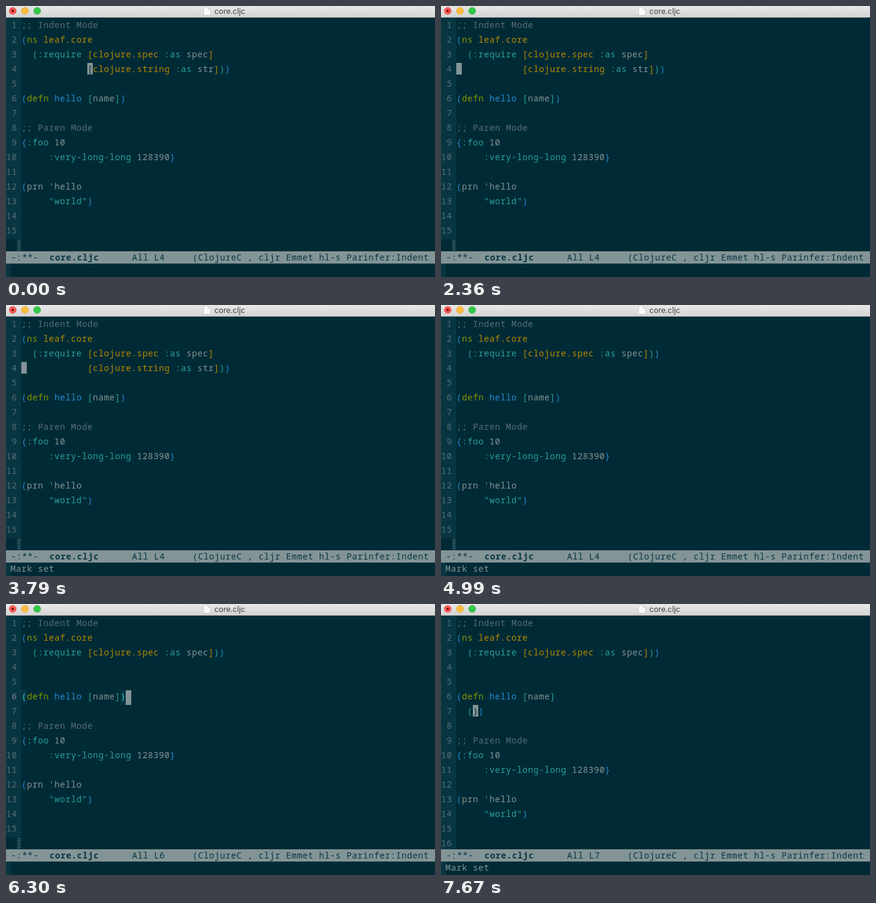
An HTML page for the animation above (8000 ms loop, 702 by 443 pixels).

```html
<!DOCTYPE html>
<html lang="en">
<head>
<meta charset="utf-8">
<title>core.cljc</title>
<style>
  html, body { margin: 0; width: 100%; height: 100%; overflow: hidden; background: #002b36; }
  svg { display: block; width: 702px; height: 443px; }
  text { font: 14px "Noto Sans Mono", monospace; letter-spacing: .6px; white-space: pre; }
  .bold { font-weight: 700; }
  #title { font: 12.5px Inter, sans-serif; letter-spacing: 0; }
</style>
</head>
<body>
<svg viewBox="0 0 702 443">
  <defs>
    <linearGradient id="bar" x2="0" y2="1">
      <stop stop-color="#e8e8e8"/><stop offset="1" stop-color="#d3d3d3"/>
    </linearGradient>
  </defs>
  <rect width="702" height="443" fill="#002b36"/>
  <rect y="19" width="25" height="382" fill="#073642"/>
  <g id="editor"></g>
  <rect y="401" width="702" height="20" fill="#839496"/>
  <rect y="421" width="8" height="22" fill="#073642"/>
  <g id="status"></g>
  <rect width="702" height="19" fill="url(#bar)"/>
  <rect y="18" width="702" height="1" fill="#b4b4b4"/>
  <g stroke-width=".6">
    <circle cx="11" cy="8" r="5.8" fill="#fc5b57" stroke="#e0443e"/>
    <circle cx="11" cy="8" r="2" fill="#6b0a08"/>
    <circle cx="31" cy="8" r="5.8" fill="#fdbc40" stroke="#dea034"/>
    <circle cx="51" cy="8" r="5.8" fill="#34c84a" stroke="#27aa35"/>
  </g>
  <path d="M323.5 1.5h7l4 4v9.5h-11z" fill="#fafafa" stroke="#c6c6c6" stroke-width=".8"/>
  <path d="M330.5 1.5v4h4" fill="#e6e6e6" stroke="#c6c6c6" stroke-width=".8"/>
  <text id="title" x="341" y="12.5" fill="#404040">core.cljc</text>
</svg>
<script>
const LOOP = 8000, CELL = 9, ROW = 24, LEFT = 25, TOP = 21;
const C = {
  bg: '#002b36', gutter: '#073642', dim: '#586e75', fg: '#839496',
  yellow: '#b58900', green: '#859900', cyan: '#2aa198', blue: '#268bd2'
};
const RAINBOW = [C.blue, C.cyan, C.yellow];

const REQUIRE = '  (:require [clojure.spec :as spec]';
const STRING = '            [clojure.string :as str]))';
const HEAD = [';; Indent Mode', '(ns leaf.core'];
const TAIL = ['', ';; Paren Mode', '{:foo 10', '     :very-long-long 128390}', '',
  "(prn 'hello", '     "world")', '', ''];
const buffer = (ns, defn) => [...HEAD, ...ns, '', ...defn, ...TAIL];

const DEFN = '(defn hello [name])';
const full = buffer([REQUIRE, STRING], [DEFN]);
const commented = buffer([REQUIRE + '))', ';' + STRING], [DEFN]);
const killed = buffer([REQUIRE + '))', ''], [DEFN]);
const opened = buffer([REQUIRE + '))', ''], [DEFN, '']);
const indented = buffer([REQUIRE + '))', ''], [DEFN, '  ']);
const paired = buffer([REQUIRE + '))', ''], ['(defn hello [name]', '  ())']);

// Each step changes only what it names; match is [row, open column, close column].
const steps = [
  [0, { lines: full, row: 4, col: 12, on: true, match: null, echo: '' }],
  [60, { match: [4, 12, 35] }],
  [230, { row: 3 }],
  [350, { match: [3, 12, 34] }],
  [700, { on: false }],
  [820, { col: 0, on: true }],
  [940, { match: null }],
  [1300, { on: false }],
  [1770, { on: true }],
  [2310, { on: false }],
  [2360, { row: 4, on: true }],
  [2840, { on: false }],
  [2900, { lines: commented, col: 1, on: true, echo: 'Mark set' }],
  [3380, { on: false }],
  [3790, { lines: full, col: 0, on: true }],
  [4270, { on: false }],
  [4450, { lines: killed, on: true }],
  [4990, { on: false }],
  [5470, { on: true }],
  [5770, { row: 5, echo: '' }],
  [5940, { row: 6 }],
  [6060, { match: [6, 0, 18] }],
  [6300, { col: 19 }],
  [6720, { lines: opened, row: 7, col: 0 }],
  [6840, { match: null }],
  [7200, { on: false }],
  [7310, { lines: indented, col: 2, on: true }],
  [7670, { lines: paired, col: 3, echo: 'Mark set' }]
];

const escape = s => s.replace(/&/g, '&amp;').replace(/</g, '&lt;');
const text = (s, x, y, fill, bold) =>
  `<text x="${x + .3}" y="${y}" fill="${fill}"${bold ? ' class="bold"' : ''}>${escape(s)}</text>`;
const rect = (x, y, w, h, fill) =>
  `<rect x="${x}" y="${y}" width="${w}" height="${h}" fill="${fill}"/>`;
const cellX = col => LEFT + col * CELL;
const rowY = row => TOP + (row - 1) * ROW;

function symbolColor(word, before) {
  if (word[0] === ';') return C.dim;
  if (word[0] === ':' || word[0] === '"') return C.cyan;
  if (word === 'ns' || word === 'defn') return C.green;
  if (before === 'defn') return C.blue;
  return word.includes('.') ? C.yellow : C.fg;
}

function drawEditor({ lines, row, col, on, match }) {
  let out = '', depth = 0, before = '', under = '';
  const matched = (r, c) => match && match[0] === r && (match[1] === c || match[2] === c);

  lines.forEach((line, i) => {
    const r = i + 1, y = rowY(r);
    out += text(String(r).padStart(2), 0, y + 15, C.dim, matched(r, 0));
    for (const m of line.matchAll(/;.*|"[^"]*"|[()[\]{}]|[^\s()[\]{}]+/g)) {
      const word = m[0], x = cellX(m.index);
      let fill, bold = false;
      if ('([{'.includes(word)) fill = RAINBOW[depth++];
      else if (')]}'.includes(word)) fill = RAINBOW[--depth];
      else fill = symbolColor(word, before);
      if (matched(r, m.index)) {
        out += rect(x, y, CELL, ROW, C.gutter);
        fill = C.cyan;
        bold = true;
      }
      if (r === row && m.index === col) under = text(word[0], x, y + 15, C.bg, bold);
      out += text(word, x, y + 15, fill, bold);
      before = word;
    }
  });

  if (lines.length < 16) {
    out += rect(0, rowY(16), 18, 20, C.bg);
    for (let y = 383; y < 400; y += 3) out += rect(18.5, y, 5, 1, C.dim);
  }
  if (on) {
    const tall = col >= lines[row - 1].length;
    out += rect(cellX(col), rowY(row), CELL, tall ? ROW : 19, C.fg) + under;
  }
  return out;
}

function drawStatus({ row, echo }) {
  const at = (s, col, bold) => text(s, 8 + col * CELL, 416, C.gutter, bold);
  return at('-:**-', 0) + at('core.cljc', 7, true) + at('All L' + row, 22) +
    at('(ClojureC , cljr Emmet hl-s Parinfer:Indent', 33) + text(echo, 7, 435.5, C.fg);
}

const editor = document.getElementById('editor');
const status_ = document.getElementById('status');
let shown = -1;

function render(t) {
  const count = steps.filter(([start]) => start <= t).length;
  if (count === shown) return;
  shown = count;
  const state = Object.assign({}, ...steps.slice(0, count).map(s => s[1]));
  editor.innerHTML = drawEditor(state);
  status_.innerHTML = drawStatus(state);
}

const begin = performance.now();
function tick() {
  render((performance.now() - begin) % LOOP);
  requestAnimationFrame(tick);
}
tick();
</script>
</body>
</html>
```
